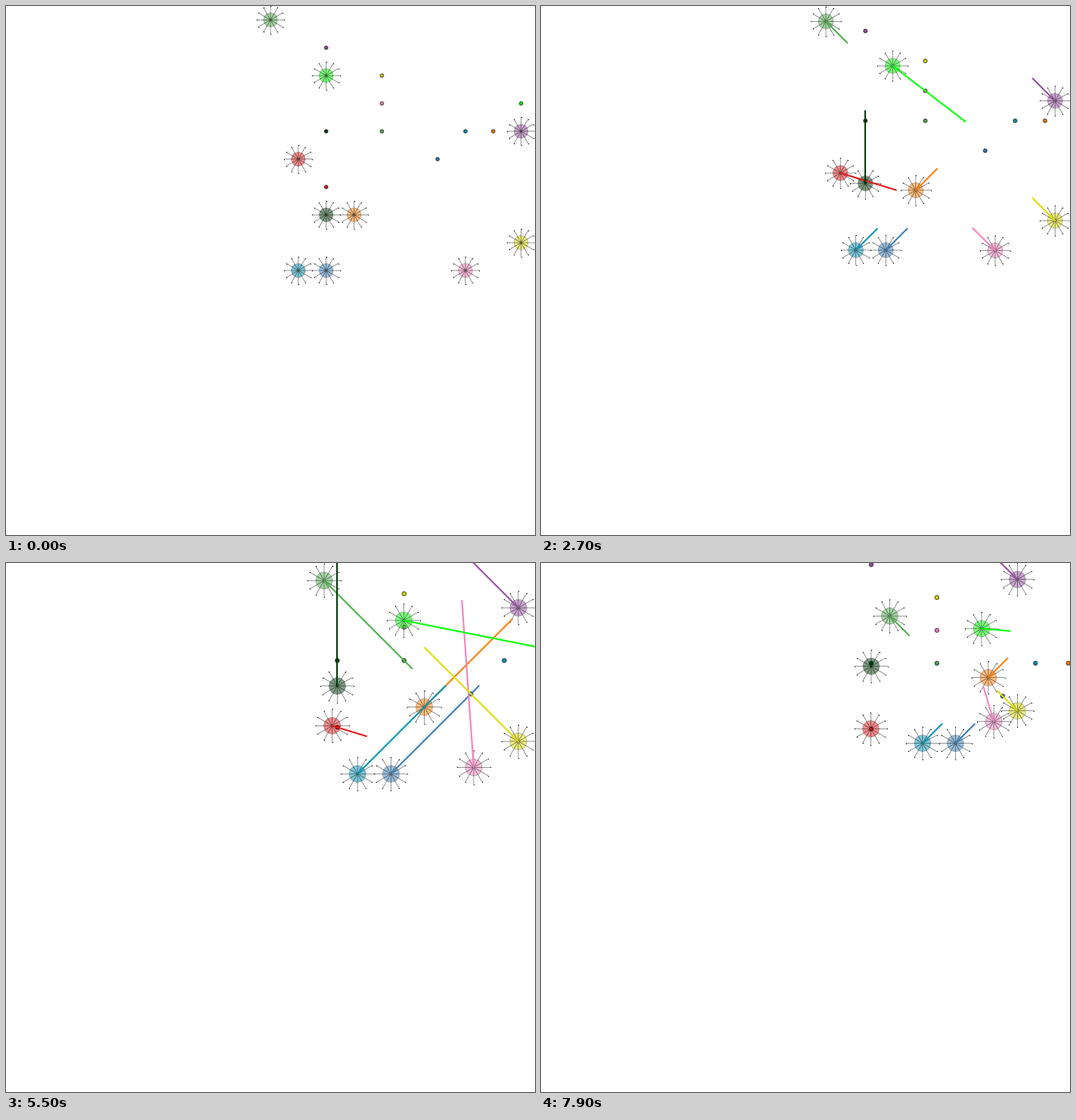
Animation of 700x700 px, one loop 8 s. Source, as a matplotlib script:

```python
import numpy as np
import matplotlib.pyplot as plt
from matplotlib.animation import FuncAnimation
from matplotlib.patches import Circle

FRAMES, STEP_MS = 80, 100
PERIOD = 20          # frames in one planning round
TICK = 0.0375        # time a round loses per frame
DT = 0.4 * TICK      # time the robots really move per frame
MAX_SPEED, REACHED = 5.0, 0.45
MARGIN = 0.5


class Robot:
    """Chases waypoints; `plans` maps a planning round to a list of them."""

    def __init__(self, color, start, goal, plans, wait=5):
        self.color, self.goal = color, goal
        self.pos, self.vel = np.zeros((FRAMES, 2)), np.zeros((FRAMES, 2))
        p, path = np.array(start, float), []
        for t in range(FRAMES):
            if t % PERIOD == 0:
                path = list(plans.get(t // PERIOD, path))
            if len(path) > 1 and np.hypot(*(path[0] - p)) < REACHED:
                path.pop(0)
            self.pos[t] = p
            if t >= wait:
                left = TICK * (PERIOD - (t + 1) % PERIOD)
                v = (np.array(path[0]) - p) / left
                v *= min(1, MAX_SPEED / max(np.hypot(*v), 1e-9))
                self.vel[t] = v
                p = p + v * DT


def diagonal(color, start, goal, dx, dy):
    path = [(start[0] + k * dx, start[1] + k * dy) for k in range(1, 5)]
    return Robot(color, start, goal, {0: path}, wait=4 if dx > 0 else 5)


robots = [
    diagonal("#377eb8", (2, 0), (6, 4), 1, 1),
    diagonal("#ff7f00", (3, 2), (8, 5), 1, 1),
    diagonal("#4daf4a", (0, 9), (4, 5), 1, -1),
    Robot("#f781bf", (7, 0), (4, 6),
          {0: [(6, 1), (6, 2), (6, 3)], 3: [(5.5, 4)]}),
    diagonal("#984ea3", (9, 5), (2, 8), -1, 1),
    Robot("#e41a1c", (1, 4), (2, 3), {0: [(1, 3), (1, 2)], 1: [(2, 3)]}),
    diagonal("#dede00", (9, 1), (4, 7), -1, 1),
    Robot("#00ff00", (2, 7), (9, 6),
          {0: [(3, 7), (4, 7)], 1: [(4, 6), (5, 6)], 3: [(6, 6)]}),
    diagonal("#0095b6", (1, 0), (7, 5), 1, 1),
    Robot("#003b0b", (2, 2), (2, 5), {0: [(2, 3), (2, 4), (2, 5)]}),
]

fig = plt.figure(figsize=(7, 7), dpi=100, facecolor="white")
ax = fig.add_axes([0, 0, 1, 1])
ax.axis("off")

angles = np.arange(12) * np.pi / 6
tips = 0.5 * np.column_stack([np.cos(angles), np.sin(angles)])
rays = np.zeros((36, 2))
rays[1::3] = tips
rays[2::3] = np.nan

parts = []
for r in robots:
    ax.add_patch(Circle(r.goal, 0.06, facecolor=r.color,
                        edgecolor=(0, 0, 0, 0.55), lw=1, zorder=1))
    body = ax.add_patch(Circle((0, 0), 0.25, facecolor=(r.color, 0.5),
                               edgecolor=(0, 0, 0, 0.25), lw=0.6, zorder=2))
    spokes, = ax.plot([], [], color="black", alpha=0.6, lw=0.5, zorder=2.2)
    ends, = ax.plot([], [], "o", color="black", ms=0.9, mew=0, zorder=2.3)
    arrow, = ax.plot([], [], color=r.color, lw=1.5, zorder=3)
    parts.append((body, spokes, ends, arrow))


def draw(t):
    reach = MARGIN + max(np.abs(r.pos[t]).max() for r in robots)
    for r, (body, spokes, ends, arrow) in zip(robots, parts):
        p, v = r.pos[t], r.vel[t]
        body.center = p
        spokes.set_data(*(rays + p).T)
        ends.set_data(*(tips + p).T)
        arrow.set_data(*np.array([p, p + v]).T)
        arrow.set_visible(bool(v.any()))
    ax.set_xlim(-reach, reach)
    ax.set_ylim(-reach, reach)
    return []


anim = FuncAnimation(fig, draw, frames=FRAMES, interval=STEP_MS,
                     init_func=lambda: draw(0), repeat=True, repeat_delay=0)
plt.show()
```
